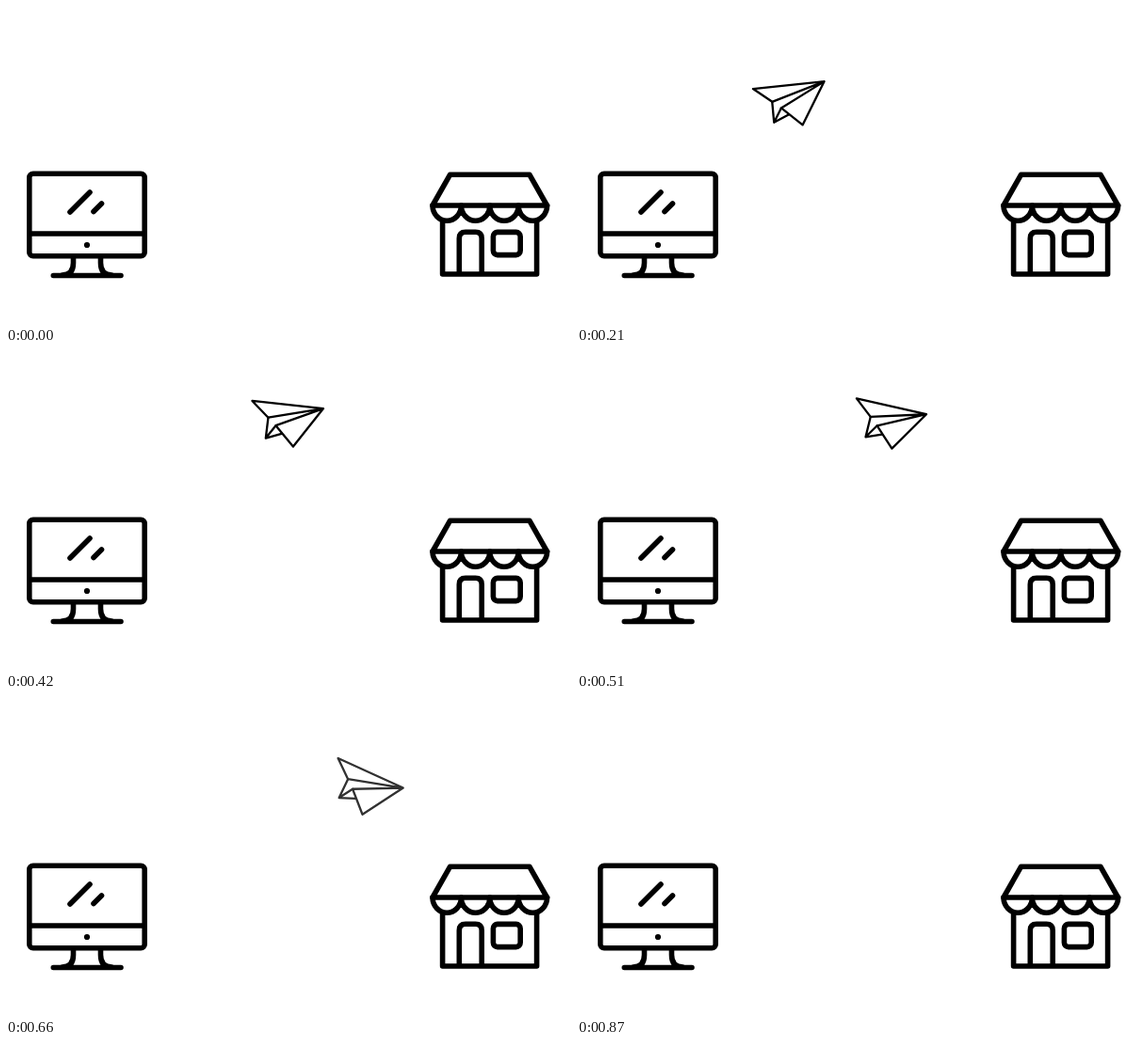
Write an HTML page that moves like this. It is 600 by 338 pixels and loops after 900 ms.

```html
<!DOCTYPE html>
<html lang="en">
<head>
<meta charset="utf-8">
<title>Paper plane delivery</title>
<style>
  html, body { margin: 0; width: 100%; height: 100%; overflow: hidden; background: #fff; }
  svg { display: block; width: 600px; height: 338px; }
  g { fill: none; stroke: #000; stroke-width: 5.6; stroke-linecap: round; stroke-linejoin: round; }
  #plane { stroke-width: 2.3; }
</style>
</head>
<body>
<svg viewBox="0 0 600 338">
  <g id="computer">
    <rect x="24.8" y="178.3" width="122.4" height="87.4" rx="4"/>
    <path d="M25 242H147M68 219L89 198M93 218.5L101.5 210"/>
    <path d="M71.5 267v6q0 13-12 13M100.5 267v6q0 13 12 13M50.3 286.5H122"/>
    <circle cx="86" cy="254" r="3.1" fill="#000" stroke="none"/>
  </g>
  <g id="store">
    <path d="M471.5 179.3H556L574.5 212H453Z"/>
    <path d="M453 212a15.2 16.3 0 0 0 30.4 0a15.2 16.3 0 0 0 30.4 0a15.2 16.3 0 0 0 30.4 0a15.2 16.3 0 0 0 30.4 0"/>
    <path d="M463.6 229V285H563.6V229"/>
    <path d="M481.3 284V247q0-6.7 6.7-6.7h10.5q6.7 0 6.7 6.7V284"/>
    <rect x="517.4" y="240.4" width="28.8" height="24.2" rx="4.5"/>
  </g>
  <g id="plane">
    <path d="M38-22H-38L-19.2-6.2L38-22L10.4 21.6L-10.3 1.4Z"/>
    <path d="M-19.2-6.2L-19.5 15.8L-10.3 1.4M-19.5 15.8L-3.3 9.3"/>
  </g>
</svg>
<script>
const LOOP = 900, STEP = 30, FLIGHT = 870;
const plane = document.getElementById('plane');

// Flight path: time in ms, x, y
const route = [
  [0, 163, 150.5], [210, 227, 106], [300, 255.3, 90.5], [420, 296.9, 77.9],
  [600, 359.8, 88.8], [750, 403.1, 120.9], [870, 433, 152]
];

const clamp = v => Math.max(0, Math.min(1, v));
const slope = (i, k) => (route[i + 1][k] - route[i][k]) / (route[i + 1][0] - route[i][0]);

function tangent(i, k) {
  if (i === 0) return slope(0, k);
  if (i === route.length - 1) return slope(i - 1, k);
  const before = route[i][0] - route[i - 1][0];
  const after = route[i + 1][0] - route[i][0];
  return (slope(i - 1, k) * after + slope(i, k) * before) / (before + after);
}

// Cubic Hermite interpolation of coordinate k
function along(t, k) {
  let i = 0;
  while (i < route.length - 2 && t >= route[i + 1][0]) i++;
  const a = route[i], b = route[i + 1], h = b[0] - a[0];
  const u = (t - a[0]) / h, v = 1 - u;
  return v * v * (1 + 2 * u) * a[k] + u * u * (1 + 2 * v) * b[k]
    + u * v * h * (v * tangent(i, k) - u * tangent(i + 1, k));
}

function draw(now) {
  const t = Math.floor(now % LOOP / STEP) * STEP;
  const p = t / FLIGHT;
  const angle = p < 0.5 ? -18 + 50 * p : 7 + 68 * (p - 0.5);
  plane.setAttribute('transform', `translate(${along(t, 1)} ${along(t, 2)}) rotate(${angle})`);
  plane.setAttribute('opacity', Math.min(clamp(p / 0.2), clamp((1 - p) / 0.3)));
}

const start = performance.now();
function tick() {
  draw(performance.now() - start);
  requestAnimationFrame(tick);
}
tick();
</script>
</body>
</html>
```
